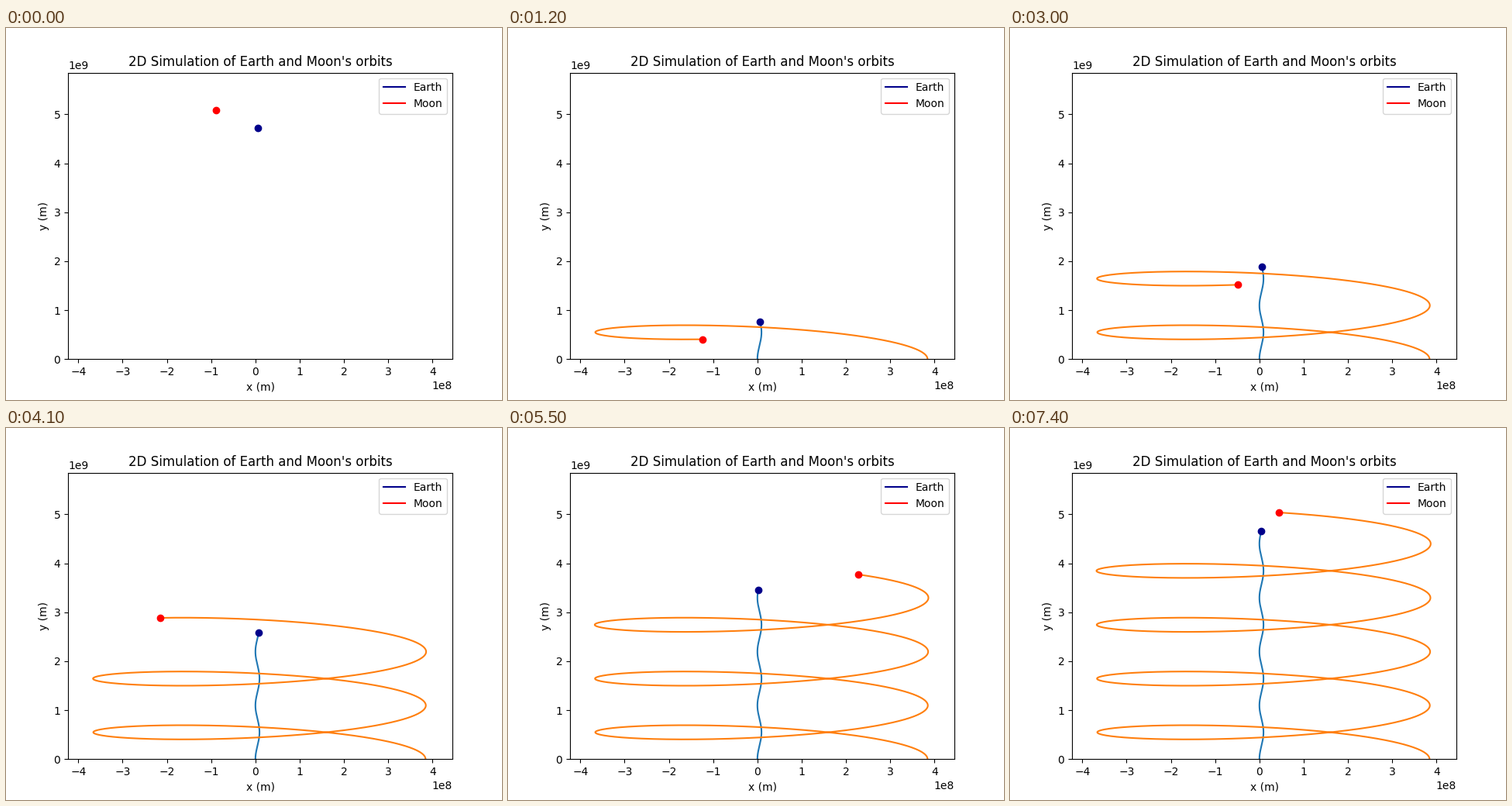
A matplotlib script that plays this animation: 640 px wide and 480 px high, repeating every 7.5 s.

```python
import numpy as np
import matplotlib.pyplot as plt
from matplotlib.animation import FuncAnimation

G = 6.67e-11
M_EARTH, M_MOON = 5.972e24, 7.348e22
DIST = 3.844e8                   # starting separation, m
V_EARTH, V_MOON = 460.0, 1478.0  # starting speeds along y, m/s
DT, STEPS = 50.0, 200_000
FRAMES, INTERVAL = 75, 100
THIN = 40                        # keep every n-th point of a trail


def simulate():
    """Explicit Euler on the separation; the barycentre drifts uniformly."""
    total = M_EARTH + M_MOON
    share = M_MOON / total
    k = G * total * DT
    sep, vel = complex(DIST, 0), complex(0, V_MOON - V_EARTH)
    path = np.empty(STEPS, dtype=complex)
    for n in range(STEPS):
        path[n] = sep
        pull = k / abs(sep) ** 3
        sep, vel = sep + vel * DT, vel - pull * sep
    v_bary = V_EARTH + share * (V_MOON - V_EARTH)
    bary = share * DIST + 1j * v_bary * DT * np.arange(STEPS)
    return bary - share * path, bary + (1 - share) * path


earth, moon = simulate()

fig, ax = plt.subplots(figsize=(6.4, 4.8), dpi=100)
ax.set_title("2D Simulation of Earth and Moon's orbits")
ax.set_xlabel("x (m)")
ax.set_ylabel("y (m)")
ax.set_xlim(1.15 * moon.real.min(), 1.15 * moon.real.max())
ax.set_ylim(0, 1.15 * moon.imag.max())

bodies = []
for name, path, color, trail_color in (
    ("Earth", earth, "darkblue", "C0"),
    ("Moon", moon, "red", "C1"),
):
    ax.plot([], [], color=color, label=name)
    trail, = ax.plot([], [], color=trail_color)
    dot, = ax.plot([], [], "o", color=color, zorder=3)
    bodies.append((path, trail, dot))
ax.legend(loc="upper right")


def draw(i):
    # The first frame has no trail and shows the bodies at their last place.
    end = round(i * STEPS / FRAMES)
    for path, trail, dot in bodies:
        head = path[end - 1]
        pts = np.append(path[:end:THIN], head) if end else path[:0]
        trail.set_data(pts.real, pts.imag)
        dot.set_data([head.real], [head.imag])
    return [artist for _, *pair in bodies for artist in pair]


anim = FuncAnimation(fig, draw, frames=FRAMES, interval=INTERVAL,
                     repeat=True, repeat_delay=0)
plt.show()
```
